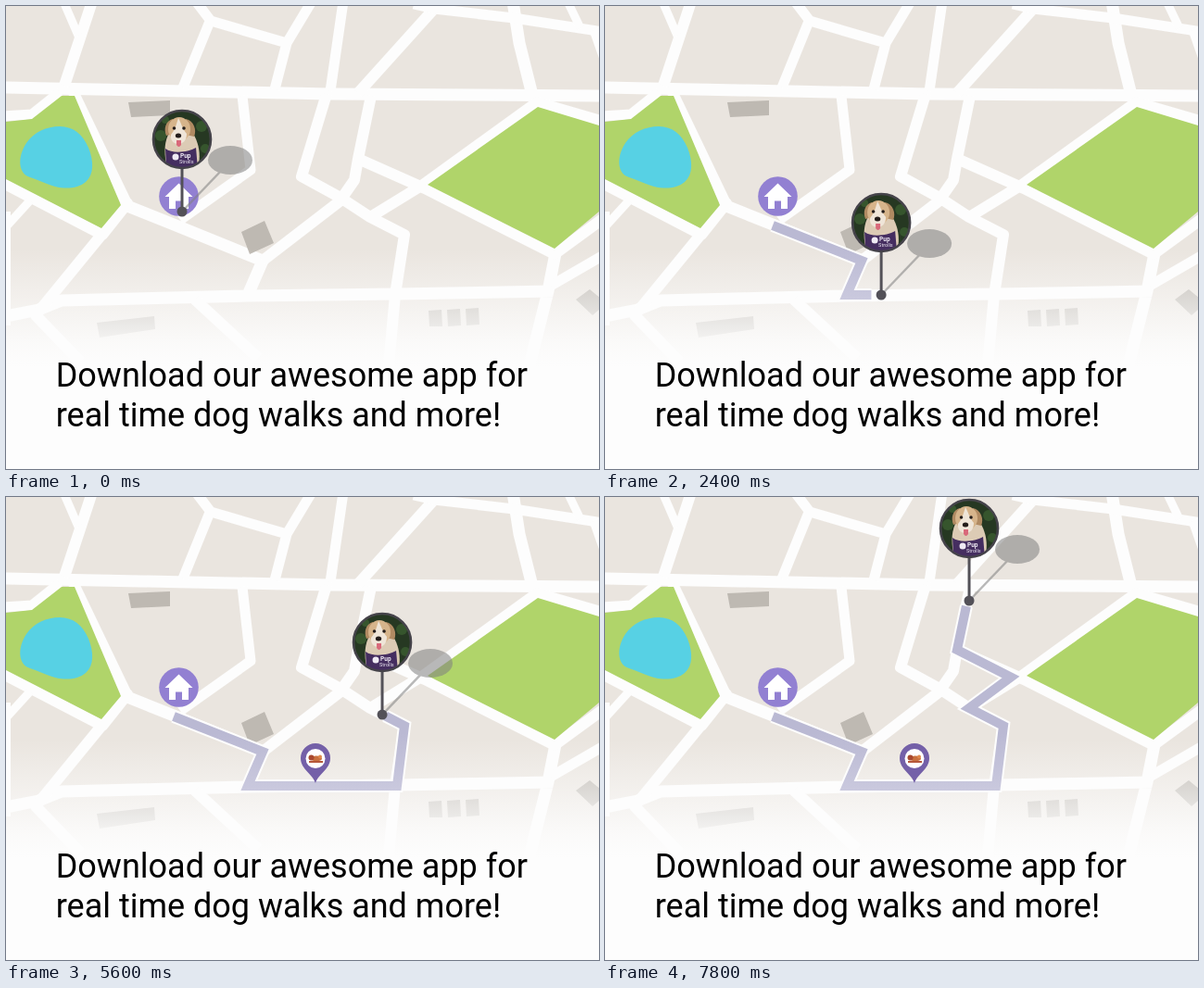
Write an HTML page that moves like this. It is 640 px wide and 500 px high and loops after 8 s.

```html
<!DOCTYPE html>
<html lang="en">
<head>
<meta charset="utf-8">
<title>Dog walk map</title>
<style>
  html, body { margin: 0; width: 100%; height: 100%; overflow: hidden; background: #fdfdfd; }
  svg { display: block; width: 100vw; height: 100vh; }
  .roads { fill: none; stroke: #fdfdfd; stroke-linejoin: round; }
  .copy { font: 36px Roboto, sans-serif; fill: #000; }
  .route { fill: none; stroke-linejoin: miter; }
</style>
</head>
<body>
<svg viewBox="0 0 640 500">
  <defs>
    <linearGradient id="fade" x1="0" y1="0" x2="0" y2="1">
      <stop offset="0" stop-color="#fdfdfd" stop-opacity="0"/>
      <stop offset=".8" stop-color="#fdfdfd" stop-opacity=".88"/>
      <stop offset="1" stop-color="#fdfdfd"/>
    </linearGradient>
    <linearGradient id="lilac" gradientUnits="userSpaceOnUse" x1="0" y1="255" x2="0" y2="318">
      <stop offset="0" stop-color="#bab9d3"/>
      <stop offset="1" stop-color="#cac9de"/>
    </linearGradient>
    <clipPath id="round"><circle r="31"/></clipPath>
  </defs>

  <!-- map -->
  <rect width="640" height="400" fill="#eae5df"/>
  <path d="M0 222H5V345H0Z" fill="#fdfdfd"/>
  <g class="roads">
    <path stroke-width="13" d="M-5 88L350 95L645 97M547-5L554 40L569 100M126 214L181 236L277 275L261 312
      M-5 336L35 328L60 318L261 313L422 311L590 308M594 262L585 308L564 392"/>
    <path stroke-width="12" d="M93-5L63 86M462 3L380 94M73 94L131 215M-5 190L104 247L131 213L32 334L80 384
      M346 95L319 184L361 207L393 228L430 247L420 312L413 388M277 275L360 211L376 188L380 165L394 97
      M380 165L452 197L592 268L645 229M393 228L450 193L573 104L645 125M204 317L272 380"/>
    <path stroke-width="11" d="M205-5L221 16L303 40M221 14L191 88M330-5L303 40L290 90M364-5L350 92
      M440-2L462 3L548 13L645 28M188 231L264 177L255 97M-5 119L28 117L58 93M588 302L645 269"/>
    <path stroke-width="9" d="M62-5L78 32M606-5L620 24M634 26L646 60M26 210L-5 244"/>
  </g>
  <g fill="#b0d46a">
    <path d="M0 125L28 122L60 97H74L124 215L103 240L0 187Z"/>
    <path d="M455 193L574 109L640 129V222L592 262Z"/>
  </g>
  <path fill="#57d1e4" d="M22 148C30 136 44 130 58 130C73 130 83 139 89 153C95 168 95 182 86 190C78 197 65 198 53 195C42 192 36 188 26 185C13 181 12 163 22 148Z"/>
  <g fill="#beb9b2">
    <path d="M132 104L177 102V118L135 120Z"/>
    <path d="M254 244L279 232L289 256L263 268Z"/>
    <path d="M98 342L160 335L161 349L101 358Z"/>
    <path d="M456 329L470 328L471 346H457ZM476 328L490 327L491 345L477 346ZM496 327L510 326L511 344L497 345Z"/>
    <path d="M615 317L630 306L648 321L633 334Z"/>
  </g>
  <rect y="262" width="640" height="128" fill="url(#fade)"/>
  <rect y="389" width="640" height="111" fill="#fdfdfd"/>

  <!-- walked route -->
  <path class="route trail" stroke="#fdfdfd" stroke-width="14"/>
  <path class="route trail" stroke="url(#lilac)" stroke-width="10"/>

  <!-- home -->
  <circle cx="186.500" cy="205.500" r="21.300" fill="#9280d2"/>
  <path fill="#fff" d="M186.500 191.500L201.500 206H197V219H190V210.500H183V219H176V206H171.500Z"/>

  <!-- stop marker, tip at its own zero point -->
  <g id="stop">
    <path fill="#7460a8" d="M0 0C-3-10-16-15-16-27A16 16 0 0 1 16-27C16-15 3-10 0 0Z"/>
    <circle cy="-26.500" r="10.500" fill="#fff"/>
    <ellipse cx="1" cy="-26.500" rx="6" ry="3" fill="#c9713f"/>
    <circle cx="-4.500" cy="-27.500" r="3" fill="#a9492f"/>
    <path d="M-7-23H8" stroke="#b5583a" stroke-width="2"/>
    <circle cx="5" cy="-28.500" r="2" fill="#e08a4c"/>
  </g>

  <!-- dog pin, foot at its own zero point -->
  <g id="pin">
    <g opacity=".55">
      <path d="M0 0L44-46" stroke="#808080" stroke-width="2.500"/>
      <ellipse cx="52" cy="-55.500" rx="24" ry="15.500" fill="#808080"/>
    </g>
    <path d="M0 0V-48" stroke="#535158" stroke-width="3"/>
    <circle r="5.500" fill="#535158"/>
    <g transform="translate(0 -78)">
      <g clip-path="url(#round)">
        <circle r="31" fill="#263822"/>
        <g fill="#36552d">
          <circle cx="-23" cy="-4" r="6"/><circle cx="21" cy="-14" r="6"/>
          <circle cx="25" cy="10" r="5"/><circle cx="-18" cy="-21" r="4"/>
        </g>
        <path fill="#dccbb5" d="M-15-5C-20 6-19 18-16 32H17C21 16 18 2 10-9Z"/>
        <path fill="#452e60" d="M-18 10C-10 16 6 14 15 9L17 32H-17Z"/>
        <path fill="#b08a62" d="M-10-22C-18-20-20-11-17-4L-10-6ZM4-22C13-20 16-10 13-3L4-5Z"/>
        <ellipse cx="-3" cy="-11" rx="12" ry="13" fill="#d6b48b"/>
        <path fill="#efe5d8" d="M-4-23C-1-18 0-12 5-6C5 1 1 5-4 5S-13 1-12-5C-7-11-6-17-4-23Z"/>
        <g fill="#241d1b">
          <circle cx="-8.500" cy="-12" r="1.800"/><circle cx="2" cy="-12" r="1.800"/>
          <ellipse cx="-4" cy="-4" rx="3.200" ry="2.500"/>
        </g>
        <path fill="#d9697a" d="M-6 1H-1V6Q-3.500 10-6 6Z"/>
        <circle cx="-7" cy="19" r="3.500" fill="#efeaf4"/>
        <text x="-2" y="20" font-family="Roboto, sans-serif" font-size="6.500" font-weight="700" fill="#efeaf4">Pup</text>
        <text x="-3" y="26" font-family="Roboto, sans-serif" font-size="5.500" fill="#efeaf4">Strolls</text>
      </g>
      <circle r="31" fill="none" stroke="#45434a" stroke-width="2.600"/>
    </g>
  </g>

  <text class="copy" x="53.700" y="411">Download our awesome app for</text>
  <text class="copy" x="53.700" y="454">real time dog walks and more!</text>
</svg>
<script>
const LOOP = 8000, STEP = 200;
const NS = 'http://www.w3.org/2000/svg';
const pin = document.getElementById('pin');
const stop = document.getElementById('stop');
const trails = document.querySelectorAll('.trail');

// the pin's own track, and the line drawn behind it
const track = document.createElementNS(NS, 'path');
track.setAttribute('d', 'M190 222L276 274L260 312H422L430 247L392 228L440 190L380 165L395 104');
trails.forEach(p => p.setAttribute('d', 'M181 237L277 275L261 312H422L430 247L393 228L438 194.5L380 165L392 108'));

// distance covered at given times
const times = [0, 1600, 3200, 4600, 5600, 6400, 7800];
const walked = [0, 121, 238.7, 343, 396, 457.6, 592.5];
const drawn = [0, 106, 234, 328, 393, 452, 581];

function at(values, t) {
  let i = 0;
  while (i < times.length - 2 && t > times[i + 1]) i++;
  const k = (t - times[i]) / (times[i + 1] - times[i]);
  return values[i] + (values[i + 1] - values[i]) * k;
}

function draw(now) {
  const t = Math.floor(now % LOOP / STEP) * STEP;
  const foot = track.getPointAtLength(at(walked, t));
  pin.setAttribute('transform', `translate(${foot.x} ${foot.y})`);

  const len = at(drawn, t);
  trails.forEach(p => {
    p.style.visibility = len > 1 ? 'visible' : 'hidden';
    p.setAttribute('stroke-dasharray', `${len} 2000`);
  });

  const grow = Math.min(1, Math.max(0, (t - 2700) / 500));
  const size = 1 - (1 - grow) ** 3;
  stop.setAttribute('transform', `translate(334 309) scale(${size})`);
  stop.style.visibility = size > 0 ? 'visible' : 'hidden';
}

function tick() {
  draw(performance.now());
  requestAnimationFrame(tick);
}
tick();
</script>
</body>
</html>
```
